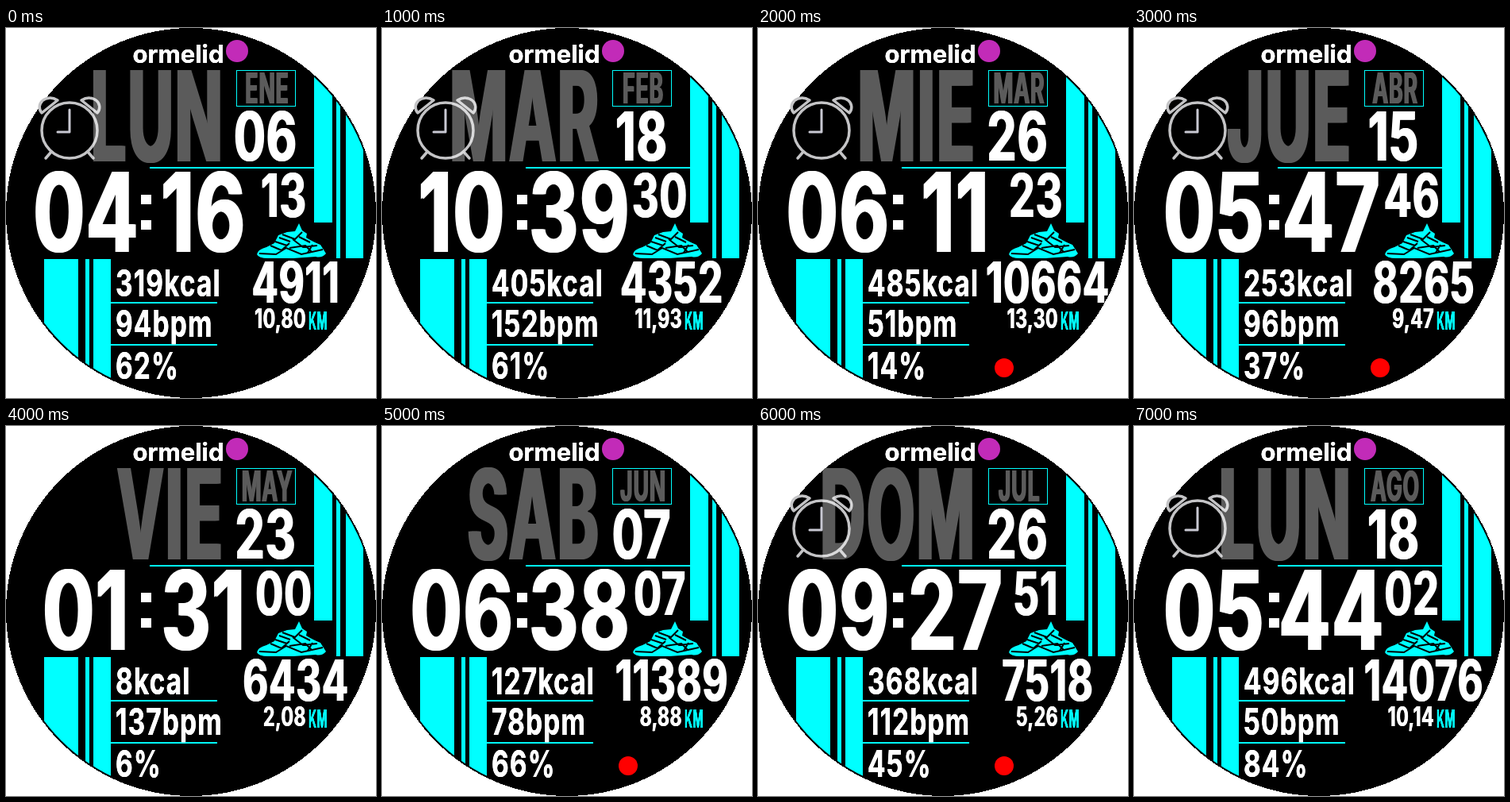
An HTML page for the animation above (8 s loop, 466 by 466 pixels).

```html
<!DOCTYPE html>
<html lang="es">
<head>
<meta charset="utf-8">
<title>Watch face</title>
<style>
html, body { margin: 0; width: 100%; height: 100%; overflow: hidden; background: #fff; }
#face { position: relative; width: 466px; height: 466px; overflow: hidden; }
svg { position: absolute; left: 0; top: 0; }

/* --x, --y: anchor and middle of the capitals; --a: alignment */
#face span {
  --a: 50%; --k: .695; --fat: .016em;
  position: absolute; left: var(--x); top: var(--y);
  font: 700 var(--s)/1 Inter, "Liberation Sans", sans-serif;
  letter-spacing: .015em;
  white-space: pre; color: #fff;
  text-shadow: var(--fat) 0, calc(var(--fat) * -1) 0;
  transform-origin: var(--a) 50%;
  transform: translate(calc(var(--a) * -1), -50%) scaleX(var(--k));
}
#face .left { --a: 0%; }
#face .right { --a: 100%; }
#face .slim { --k: .495; --fat: .028em; letter-spacing: .03em; }
#face .dim { opacity: .355; }
#face .brand { --k: 1; --fat: 0em; letter-spacing: 0; }
#face .unit { --k: .45; --fat: 0em; color: #0ff; }
#face .stat { --x: 138px; --s: 47px; --k: .71; --fat: .005em; letter-spacing: .035em; }
#hour, #min { --y: 231px; --s: 139px; }
</style>
</head>
<body>
<div id="face">
  <svg width="466" height="466" viewBox="0 0 466 466">
    <clipPath id="rim"><circle cx="233" cy="233" r="231"/></clipPath>
    <circle cx="233" cy="233" r="233" shape-rendering="crispEdges"/>
    <g fill="#0ff" clip-path="url(#rim)">
      <path d="M388 0h23v245h-23zM416 0h5v290h-5zM428 0h22v290h-22z"/>
      <path d="M48 291h43v175h-43zM100 291h5v175h-5zM110 291h22v175h-22z"/>
      <path d="M181 175h207v2h-207zM132 345h134v2h-134zM132 398h134v2h-134z"/>
    </g>
    <rect x="290.5" y="53.5" width="74" height="45" fill="none" stroke="#0ff"/>
    <circle cx="291" cy="29" r="14" fill="#c22bb8"/>
    <path fill="#fff" d="M170 210h13v12h-13zM170 242h13v12h-13z"/>
    <g id="alarm" fill="none" stroke="#c4c4c6" stroke-width="3.5" stroke-linecap="round" stroke-linejoin="round">
      <circle cx="80" cy="129" r="35"/>
      <path d="M45 107C36 96 50 82 65 91ZM115 107C124 96 110 82 95 91ZM57 156l-7 8M103 156l7 8"/>
      <path stroke="#c8c8d2" stroke-width="3" d="M80 103v28H65"/>
    </g>
    <path fill="#0ff" d="M316 285Q317 279 328 276L338 271 343 261 354 257 364 256 369 246 373 255 379 259 378 264Q388 270 396 273L403 284Q398 290 390 288L362 290H330Q318 290 316 285Z"/>
    <path fill="none" stroke="#000" stroke-width="2" d="M319 284L340 285 353 277 372 285 399 279M333 274l14 6 10-9M339 269l15 5M344 264l14 5M348 260l16 6 9-9M361 266l13 10 18-2M357 277l20-3 8 8M369 263l14 7M380 283l6-10"/>
    <circle id="link" cx="310" cy="428" r="12" fill="#f00"/>
  </svg>

  <span class="brand" style="--x:217px;--y:32px;--s:31px">ormelid</span>
  <span id="day" class="right slim dim" style="--x:275px;--y:110.5px;--s:158px"></span>
  <span id="month" class="slim dim" style="--x:328.5px;--y:75.5px;--s:54px"></span>
  <span id="date" style="--x:327px;--y:135.5px;--s:85px"></span>
  <span id="hour" style="--x:100.5px"></span>
  <span id="min" style="--x:249px"></span>
  <span id="sec" style="--x:350px;--y:209.5px;--s:75px"></span>
  <span id="kcal" class="left stat" style="--y:320px"></span>
  <span id="bpm" class="left stat" style="--y:371px"></span>
  <span id="batt" class="left stat" style="--y:423.5px"></span>
  <span id="steps" style="--x:364.5px;--y:319.5px;--s:71px"></span>
  <span id="dist" class="right" style="--x:377.5px;--y:366.5px;--s:33.5px"></span>
  <span class="left slim unit" style="--x:381px;--y:368px;--s:31px">KM</span>
</div>
<script>
const $ = id => document.getElementById(id);
const fields = "day month date hour min sec kcal bpm batt steps dist".split(" ");

// one reading per second; A = alarm set, L = link lost
const readings = `
LUN ENE 06 04 16 13 319kcal 94bpm 62% 4911 10,80 A
MAR FEB 18 10 39 30 405kcal 152bpm 61% 4352 11,93 A
MIE MAR 26 06 11 23 485kcal 51bpm 14% 10664 13,30 AL
JUE ABR 15 05 47 46 253kcal 96bpm 37% 8265 9,47 AL
VIE MAY 23 01 31 00 8kcal 137bpm 6% 6434 2,08 -
SAB JUN 07 06 38 07 127kcal 78bpm 66% 11389 8,88 L
DOM JUL 26 09 27 51 368kcal 112bpm 45% 7518 5,26 AL
LUN AGO 18 05 44 02 496kcal 50bpm 84% 14076 10,14 A
`.trim().split("\n").map(line => line.split(" "));

let shown = -1;

function show(i) {
  const row = readings[i];
  const flags = row[fields.length];
  fields.forEach((id, n) => { $(id).textContent = row[n]; });
  $("alarm").style.display = flags.includes("A") ? "" : "none";
  $("link").style.display = flags.includes("L") ? "" : "none";
  shown = i;
}

function tick() {
  const i = Math.floor(performance.now() / 1000) % readings.length;
  if (i !== shown) show(i);
  requestAnimationFrame(tick);
}

show(0);
requestAnimationFrame(tick);
</script>
</body>
</html>
```
